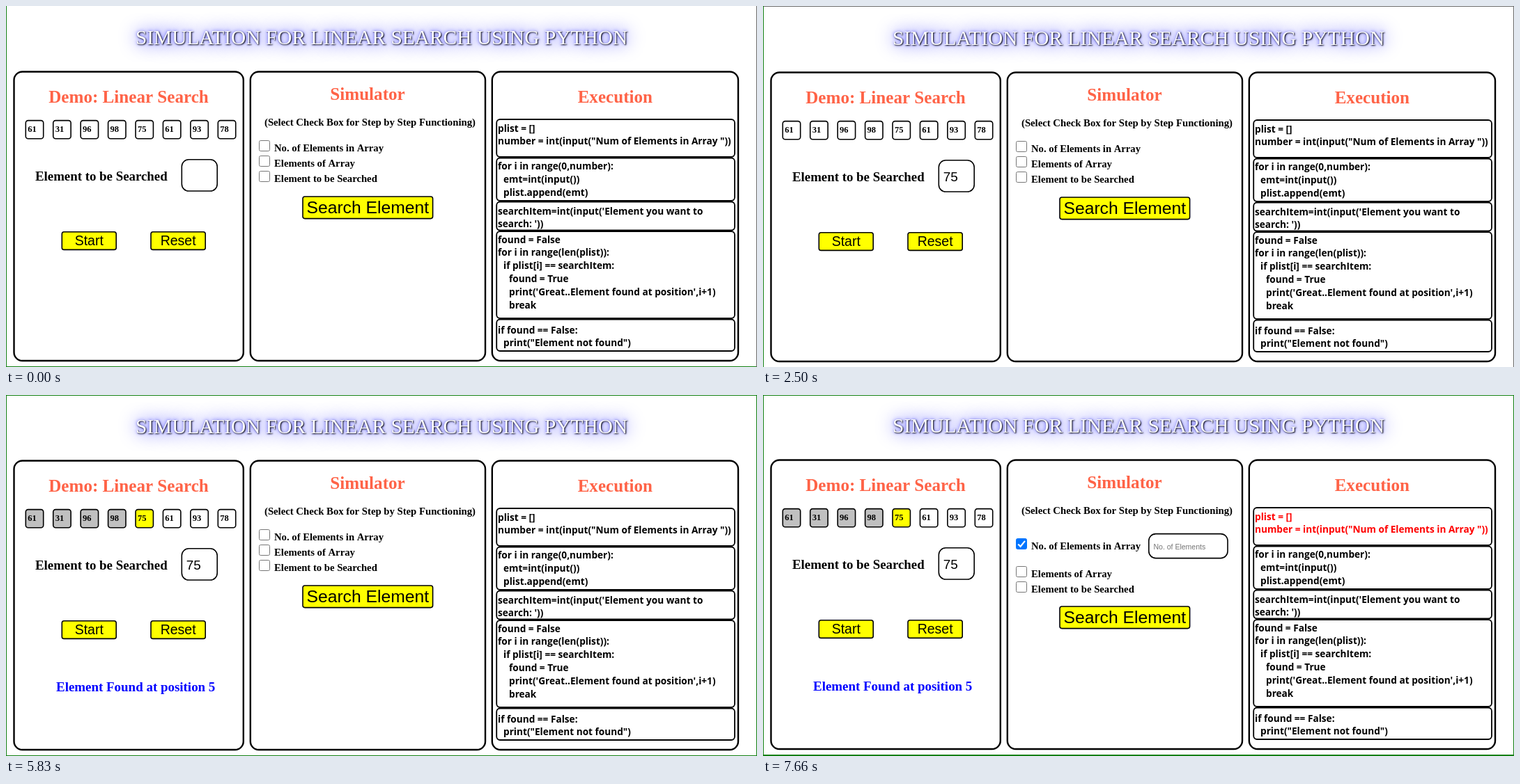
Animation, 1078 px wide and 519 px high, one loop 8 s. Source, as an HTML page with a canvas:

```html
<!DOCTYPE html>
<html lang="en">
<head>
<meta charset="utf-8">
<title>Linear search simulation</title>
<style>
html, body { margin: 0; width: 100%; height: 100%; overflow: hidden; background: #fff; }
canvas { display: block; }
</style>
</head>
<body>
<canvas id="stage" width="1078" height="519"></canvas>
<script>
const ctx = document.getElementById('stage').getContext('2d');
const W = 1078, H = 519, LOOP = 8000;
const SERIF = '"Liberation Serif", serif';
const SANS = '"Liberation Sans", sans-serif';
const CODE_FONT = 'bold 13.65px "Open Sans", sans-serif';
const GREEN = '#138013', GRAY = '#6b6b6b';

// Each step: start time, vertical page offset, and what is shown.
const steps = [
  { at: 0, dy: 0, edges: { left: GREEN, right: GRAY, bottom: GREEN } },
  { at: 500, dy: 1, typed: true, edges: { left: GREEN, right: GRAY, top: GRAY } },
  { at: 3830, dy: 0, typed: true, found: true,
    edges: { left: GREEN, right: GREEN, top: GREEN, bottom: GREEN } },
  { at: 7160, dy: -1, typed: true, found: true, checked: true,
    edges: { left: GREEN, right: GREEN, top: GREEN, bottom: GREEN, base: 2 } }
];

const list = [61, 31, 96, 98, 75, 61, 93, 78];

const blocks = [
  { top: 163, bottom: 217, base: 180.5, lines: [
    'plist = []',
    'number = int(input("Num of Elements in Array "))'] },
  { top: 218.5, bottom: 280, base: 235, lines: [
    'for i in range(0,number):',
    '  emt=int(input())',
    '  plist.append(emt)'] },
  { top: 281.5, bottom: 322.5, base: 299.5, lines: [
    "searchItem=int(input('Element you want to",
    "search: '))"] },
  { top: 324, bottom: 449, base: 340.5, lines: [
    'found = False',
    'for i in range(len(plist)):',
    '  if plist[i] == searchItem:',
    '    found = True',
    "    print('Great..Element found at position',i+1)",
    '    break'] },
  { top: 450.5, bottom: 496, base: 470.5, lines: [
    'if found == False:',
    '  print("Element not found")'] }
];

function text(str, x, y, font, color = '#000', align = 'left') {
  ctx.font = font;
  ctx.fillStyle = color;
  ctx.textAlign = align;
  ctx.fillText(str, x, y);
}

const bold = (str, x, y, size, color, align) =>
  text(str, x, y, `bold ${size}px ${SERIF}`, color, align);

function box(x, y, right, bottom, radius, line, fill = '#fff', stroke = '#000') {
  ctx.beginPath();
  ctx.roundRect(x, y, right - x, bottom - y, radius);
  ctx.fillStyle = fill;
  ctx.fill();
  ctx.lineWidth = line;
  ctx.strokeStyle = stroke;
  ctx.stroke();
}

function button(label, x, y, right, bottom, base, size) {
  box(x, y, right, bottom, 3, 1.6, '#ff0');
  text(label, (x + right) / 2, base, `${size}px ${SANS}`, '#000', 'center');
}

function drawTitle() {
  const font = `29.4px ${SERIF}`, far = 2000;
  const title = 'SIMULATION FOR LINEAR SEARCH USING PYTHON';
  const shadows = [['rgba(0, 0, 255, 0.6)', 5, 0], ['blue', 26, 0], ['black', 2, 1]];
  for (const [color, blur, shift] of shadows) {
    ctx.save();
    ctx.shadowColor = color;
    ctx.shadowBlur = blur;
    ctx.shadowOffsetX = shift;
    ctx.shadowOffsetY = far + shift;
    text(title, 539, 54.5 - far, font, '#000', 'center');
    ctx.restore();
  }
  text(title, 539, 54.5, font, '#fff', 'center');
}

function drawDemo(s) {
  box(11.5, 94.5, 340.8, 510, 12, 2.4);
  bold('Demo: Linear Search', 176, 139, 25.1, 'tomato', 'center');
  const hit = list.indexOf(75);
  list.forEach((n, i) => {
    const x = 28.3 + i * 39.43;
    const fill = !s.found || i > hit ? '#fff' : i === hit ? '#ff0' : '#c0c0c0';
    box(x, 164.6, x + 25.4, 190.8, 3.5, 1.6, fill);
    bold(n, x + 2.9, 181, 12.56);
  });
  bold('Element to be Searched', 42, 251, 18.85);
  box(252.3, 220.8, 303.2, 266, 10, 1.6);
  if (s.typed) text('75', 258.8, 250.6, `18.9px ${SANS}`);
  button('Start', 80.3, 324.8, 158.2, 350.4, 344, 19.5);
  button('Reset', 208, 324.8, 286.2, 350.4, 344, 19.5);
  if (s.found) bold('Element Found at position 5', 72, 426, 18.95, '#00f');
}

function checkbox(label, y, on) {
  if (on) {
    box(363.5, y - 7, 378.5, y + 8, 2, 1, '#0075ff', '#0075ff');
    ctx.beginPath();
    ctx.moveTo(366.2, y + 1);
    ctx.lineTo(369.6, y + 4.3);
    ctx.lineTo(376, y - 3.6);
    ctx.lineWidth = 2.2;
    ctx.strokeStyle = '#fff';
    ctx.stroke();
  } else {
    box(363.5, y - 7.5, 378.5, y + 7.5, 2, 1, '#fff', '#767676');
  }
  bold(label, 385, y + 8, 14.7);
}

function drawSimulator(s) {
  const push = s.checked ? 32 : 0;
  box(350.8, 94.5, 688, 510, 12, 2.4);
  bold('Simulator', 519, 135, 25.1, 'tomato', 'center');
  bold('(Select Check Box for Step by Step Functioning)', 371, 172, 14.72);
  checkbox('No. of Elements in Array', s.checked ? 214.5 : 201, s.checked);
  if (s.checked) {
    box(553.8, 200.6, 667, 235.6, 10, 1.6);
    text('No. of Elements', 560.5, 222.5, `10.5px ${SANS}`, '#757575');
  }
  checkbox('Elements of Array', 223 + push, false);
  checkbox('Element to be Searched', 245 + push, false);
  const top = 274 + (s.checked ? 31 : 0);
  button('Search Element', 426, top, 612.6, top + 31.6, top + 24, 24.7);
}

function drawExecution(s) {
  box(697.8, 94.5, 1051, 510, 12, 2.4);
  bold('Execution', 874.3, 139, 25.1, 'tomato', 'center');
  blocks.forEach((b, k) => {
    box(704.2, b.top, 1046, b.bottom, 5, 1.8);
    const color = s.checked && k === 0 ? '#f00' : '#000';
    b.lines.forEach((line, i) => {
      const code = line.trimStart();
      const indent = (line.length - code.length) * 4;
      text(code, 706 + indent, b.base + i * 18.85, CODE_FONT, color);
    });
  });
}

function drawEdges({ left, right, top, bottom, base = 1 }) {
  const edge = (color, x, y, w, h) => {
    if (!color) return;
    ctx.fillStyle = color;
    ctx.fillRect(x, y, w, h);
  };
  edge(top, 0, 0, W, 1);
  edge(bottom, 0, H - base, W, base);
  edge(right, W - 1, 0, 1, H);
  edge(left, 0, 0, 1, H);
}

function draw(now) {
  const t = now % LOOP;
  const s = steps.findLast(step => t >= step.at);
  ctx.fillStyle = '#fff';
  ctx.fillRect(0, 0, W, H);
  ctx.save();
  ctx.translate(0, s.dy);
  drawTitle();
  drawDemo(s);
  drawSimulator(s);
  drawExecution(s);
  ctx.restore();
  drawEdges(s.edges);
}

const start = performance.now();
function tick() {
  draw(performance.now() - start);
  requestAnimationFrame(tick);
}
tick();
</script>
</body>
</html>
```
